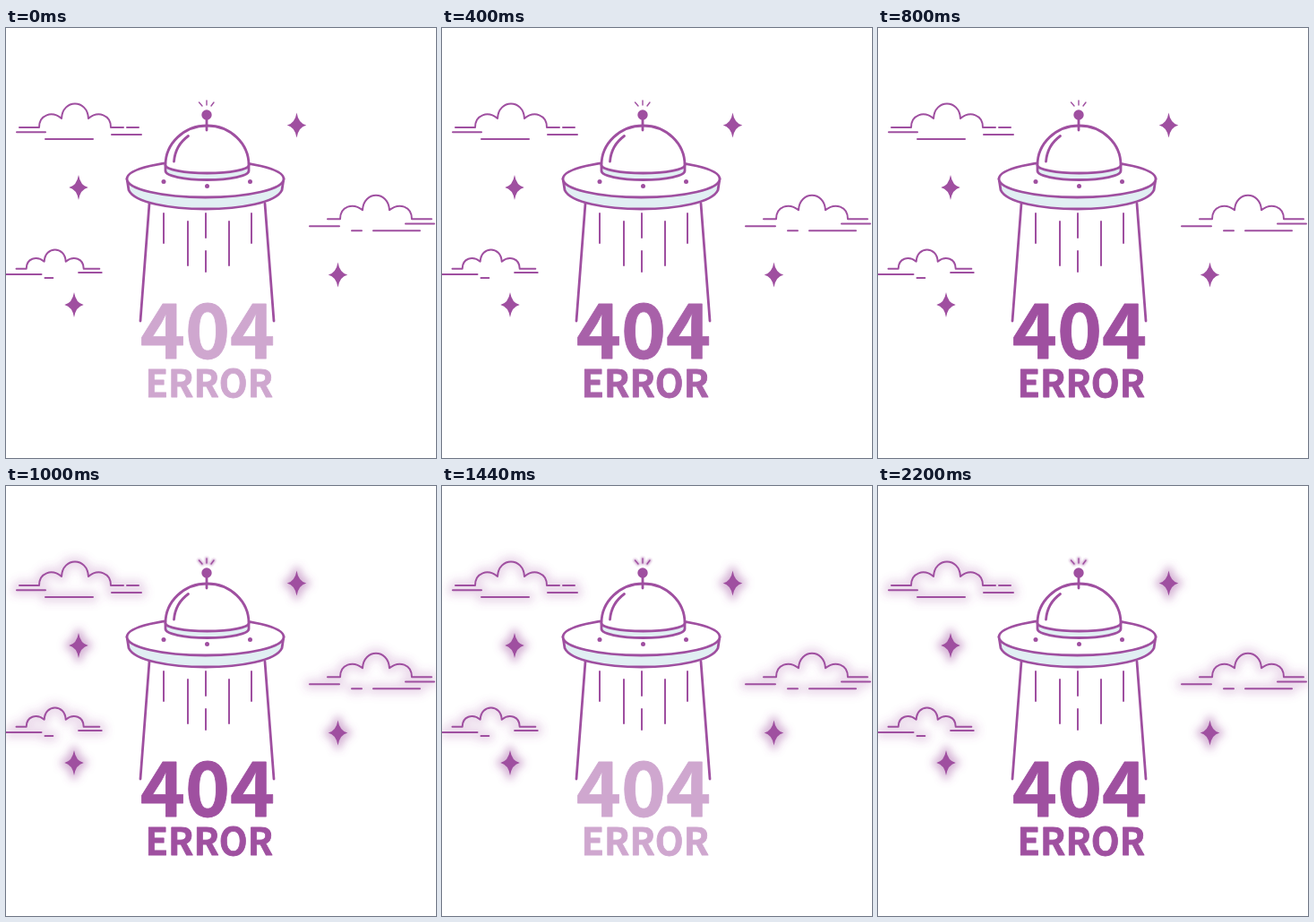
Animation, 480 px wide and 480 px high, one loop 2400 ms. Source, as an HTML page:

```html
<!DOCTYPE html>
<html lang="en">
<head>
<meta charset="utf-8">
<title>404 error</title>
<style>
  html, body { margin: 0; width: 100%; height: 100%; overflow: hidden; background: #fff; }
  svg { display: block; width: 100%; height: 100%; }
  .ink { fill: none; stroke: #9f4fa0; stroke-linecap: round; stroke-linejoin: round; }
  .ink path { vector-effect: non-scaling-stroke; }
  .solid { fill: #9f4fa0; }
  .glass { fill: #e1eff3; }
  .white { fill: #fff; }
  #glow { opacity: 0; }
  #label {
    fill: #9f50a0; stroke: #9f50a0; stroke-width: .8; stroke-linejoin: round;
    text-anchor: middle; font-weight: 700;
    font-family: "Noto Sans CJK JP", "Noto Sans CJK SC", "Noto Sans CJK", "Noto Sans", sans-serif;
  }
</style>
</head>
<body>
<svg viewBox="0 0 480 480">
  <defs>
    <filter id="soft" filterUnits="userSpaceOnUse" x="0" y="0" width="480" height="480">
      <feGaussianBlur stdDeviation="5"/>
    </filter>
    <filter id="slight" filterUnits="userSpaceOnUse" x="200" y="70" width="50" height="40">
      <feGaussianBlur stdDeviation="0.8"/>
    </filter>
    <path id="rays" d="M215.5 83L219 87M224 81V86M232 83L229 87"/>
  </defs>

  <g id="glow" class="ink">
    <g filter="url(#soft)">
      <g id="cloudGlow" stroke-width="13" opacity=".2"></g>
      <g id="starGlow" stroke-width="9" opacity=".45"></g>
    </g>
    <use href="#rays" stroke-width="4" opacity=".45" filter="url(#slight)"/>
  </g>

  <g id="clouds" class="ink" stroke-width="2"></g>
  <g id="stars" class="solid"></g>
  <g id="streaks" class="ink" stroke-width="2"></g>

  <g class="ink" stroke-width="2.8">
    <path d="M160 196L150 327M289 196L299 327"/>
    <path class="glass" d="M135 168L137 181C150 209 295 209 308 181L310 168Z"/>
    <ellipse class="white" cx="222.5" cy="168.5" rx="87.5" ry="20.5"/>
    <path class="glass" d="M178 153V159.5A46.5 10 0 0 0 271 159.5V153Z"/>
    <path class="white" d="M178 153A46.5 44 0 0 1 271 153A46.5 9 0 0 1 178 153Z"/>
    <path d="M187.5 149Q189 131 203.5 120.5"/>
    <path d="M224 100V114"/>
    <use href="#rays" stroke-width="1.4"/>
  </g>
  <g class="solid">
    <circle cx="224" cy="97" r="5.7"/>
    <circle cx="176" cy="171.5" r="2.5"/>
    <circle cx="224.5" cy="176.5" r="2.5"/>
    <circle cx="272.5" cy="171.5" r="2.5"/>
  </g>

  <g id="label">
    <text x="225" y="368.5" font-size="85">404</text>
    <text x="226.8" y="411.8" font-size="41.5">ERROR</text>
  </g>
</svg>
<script>
  const $ = id => document.getElementById(id);
  const path = (d, attrs = '') => `<path ${attrs} d="${d}"/>`;
  const place = (x, y, sx = 1, sy = sx) => `transform="translate(${x} ${y}) scale(${sx} ${sy})"`;

  // All clouds share one outline; the first is mirrored, the last is smaller.
  const puffs = 'M-14 0H0C0-14 14-19 25-10C26-32 54-32 55-10C66-19 80-14 80 0H102';
  const shade = 'M73 5.3H105M-34 8H-1';
  const cloud = (x, y, sx, sy, extra) => path(puffs + shade + extra, place(x, y, sx, sy));
  const clouds =
    cloud(117, 111, -1, 1, 'M-31 0H-18M20 13H73') +
    cloud(373, 213.3, 1, 1, 'M13 13H24M37 13H89') +
    cloud(22.7, 268.7, 0.8, 0.8, 'M-1 8H21M26 13H37');

  const sparkle = 'M0-14Q2-2 10.7 0Q2 2 0 14Q-2 2-10.7 0Q-2-2 0-14Z';
  const stars = [[324.5, 108.5], [81, 178], [370.5, 275.5], [76, 309]]
    .map(([x, y]) => path(sparkle, place(x, y))).join('');

  // Streaks grow towards the middle one, which is broken by a gap.
  const streaks = [176, 203, 223, 249, 274].map((x, i) => {
    const mid = i === 2;
    const top = i % 2 ? 216 : 207;
    const length = 65 - 16 * Math.abs(i - 2);
    return path(`M${x} ${top}v${length}`, mid ? 'stroke-dasharray="27 15"' : '');
  }).join('');

  $('clouds').innerHTML = $('cloudGlow').innerHTML = clouds;
  $('stars').innerHTML = $('starGlow').innerHTML = stars;
  $('streaks').innerHTML = streaks;

  // Hold each opacity for an equal share of the duration, then jump.
  const blink = (el, levels, duration) => el.animate(
    [...levels, levels[levels.length - 1]].map((opacity, i) => (
      { opacity, offset: i / levels.length, easing: 'step-end' }
    )),
    { duration, iterations: Infinity }
  );

  blink($('glow'), [0, 1], 400);
  blink($('label'), [0.5, 0.9, 1], 1200);
</script>
</body>
</html>
```
